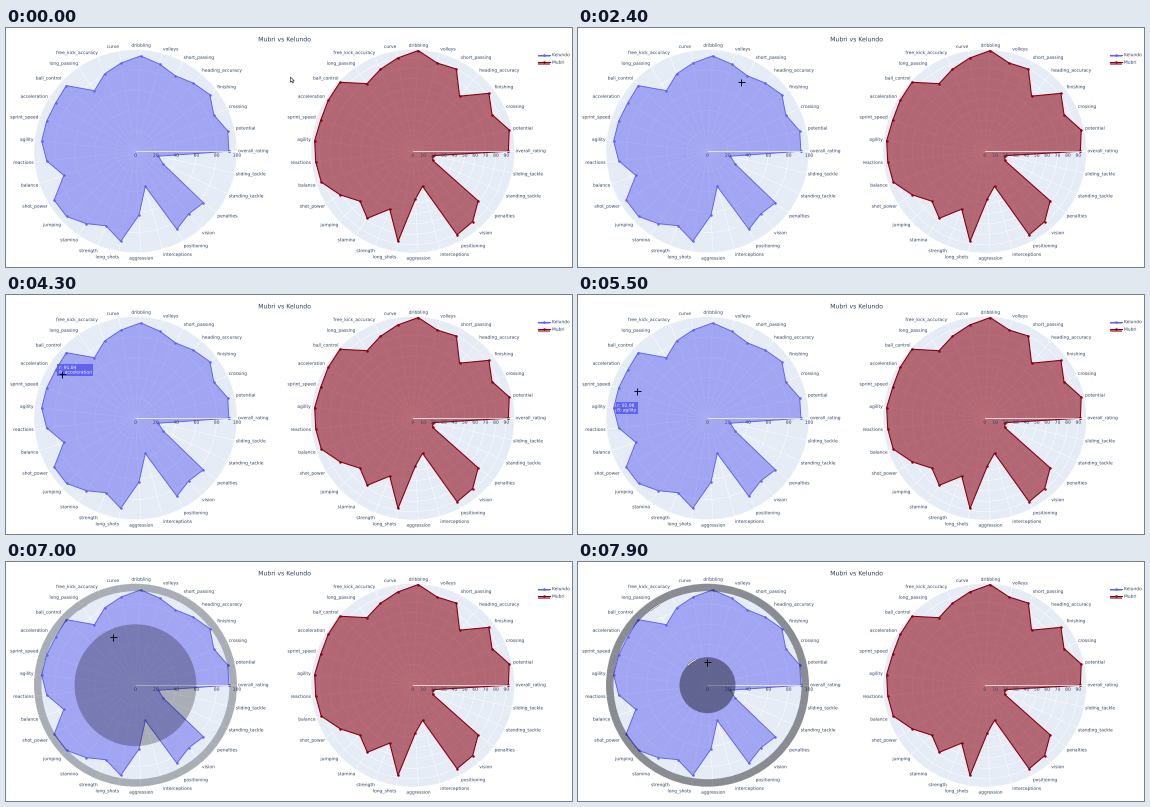
Animation of 566x239 px, one loop 8000 ms. Source, as a matplotlib script:

```python
import numpy as np
import matplotlib.pyplot as plt
from matplotlib.animation import FuncAnimation
from matplotlib.patches import Circle, Polygon, Rectangle, Wedge
from matplotlib.patheffects import Normal

W, H, DPI = 566, 239, 64
PT = 72 / DPI  # points per pixel
FRAMES, STEP = 80, 100
R, CY = 101.5, 123.2
LEFT, RIGHT = 129.5, 406.8
INK, PAPER, BLUE, RED = "#2a3f5f", "#e5ecf6", "#6062f0", "#8b0010"
FIRST, SECOND = "Kelundo", "Mubri"

SKILLS = """overall_rating potential crossing finishing heading_accuracy
short_passing volleys dribbling curve free_kick_accuracy long_passing
ball_control acceleration sprint_speed agility reactions balance shot_power
jumping stamina strength long_shots aggression interceptions positioning
vision penalties standing_tackle sliding_tackle""".split()
ANGLES = np.arange(len(SKILLS)) * 2 * np.pi / len(SKILLS)


def profile(**turns):
    """Ratings for all skills, interpolated between the turning points."""
    at = [SKILLS.index(name) for name in turns]
    return np.interp(range(len(SKILLS)), at, list(turns.values()))


blue_values = profile(
    overall_rating=92, potential=93, crossing=85, finishing=92,
    short_passing=84, dribbling=94, free_kick_accuracy=82, long_passing=72,
    ball_control=93.96, acceleration=91.84, agility=92.96, reactions=88,
    balance=74.5, shot_power=93.5, jumping=93.5, strength=79, long_shots=90,
    interceptions=36, positioning=87, vision=81, penalties=84,
    standing_tackle=30, sliding_tackle=23)
red_values = profile(
    overall_rating=92, potential=95, crossing=84, finishing=92,
    heading_accuracy=69.5, short_passing=89.5, volleys=88, dribbling=97,
    long_passing=78.5, ball_control=96.5, sprint_speed=93.5, agility=95,
    balance=93, jumping=70, stamina=78, strength=60, long_shots=88,
    aggression=46, interceptions=35, positioning=91, vision=89, penalties=79,
    standing_tackle=21, sliding_tackle=20)

plt.rcParams.update({"font.family": "DejaVu Sans", "text.hinting": "none",
                     "toolbar": "None"})
fig = plt.figure(figsize=(W / DPI, H / DPI), dpi=DPI, facecolor="white")
ax = fig.add_axes([0, 0, 1, 1])
ax.set(xlim=(0, W), ylim=(H, 0))
ax.axis("off")


def label(x, y, text, size=4.42, **kw):
    # The path effect draws glyphs as outlines, keeping subpixel spacing
    kw = {"color": INK, "ha": "center", "va": "center", **kw}
    return ax.text(x, y, text, fontsize=size * PT,
                   path_effects=[Normal()], **kw)


def polar(cx, radius, angle):
    return cx + radius * np.cos(angle), CY - radius * np.sin(angle)


def radar(cx, values, top, step, color, opacity, width):
    ax.add_patch(Circle((cx, CY), R, fc=PAPER, lw=0, zorder=1))
    unit = R / top
    ticks = np.arange(0, top + 0.1, step)
    grid = dict(lw=0.45 * PT, zorder=1.1)
    for t in ticks[1:]:
        ax.add_patch(Circle((cx, CY), t * unit, fill=False, ec="white", **grid))
    for a, name in zip(ANGLES, SKILLS):
        x, y = polar(cx, R, a)
        ax.plot([cx, x], [CY, y], color="white", **grid)
        c, s = np.cos(a), np.sin(a)
        ha = "center" if abs(c) < 0.1 else "left" if c > 0 else "right"
        label(x + 1.2 * c, y - (4.2 if s > 0 else 6) * s, name, ha=ha)
    points = np.column_stack(polar(cx, values * unit, ANGLES))
    ax.add_patch(Polygon(points, fc=color, alpha=opacity, lw=0, zorder=2))
    ax.plot(*np.vstack([points, points[:1]]).T, color=color, lw=width * PT,
            marker="o", ms=2.5 * PT, mew=0, zorder=2.1)
    ax.plot([cx, cx + R], [CY, CY], color="white", lw=0.7 * PT, zorder=2.2)
    for t in ticks:
        label(cx + t * unit, CY + 4.4, f"{t:.0f}", zorder=2.3)
    return points


def legend_row(y, name, color, opacity):
    ax.add_patch(Rectangle((532, y), 11.6, 2.5, fc=color, alpha=opacity, lw=0))
    ax.plot([532, 543.6], [y, y], color=color, lw=1.1 * PT)
    ax.plot([537.8], [y], "o", color=color, ms=2.5 * PT, mew=0)
    label(546, y + 0.4, name, ha="left")


blue_points = radar(LEFT, blue_values, 100, 20, BLUE, 0.5, 0.95)
radar(RIGHT, red_values, 97.7, 10, RED, 0.56, 1.1)
label(278.5, 11.7, f"{SECOND} vs {FIRST}", size=6.15)
legend_row(26.7, FIRST, BLUE, 0.5)
legend_row(34.2, SECOND, RED, 0.56)

# Zoom selection: dimmed outer ring, dimmed inner disc, two corner handles
OUTER, DRAG_ANGLE = 94, np.radians(124)
shade = dict(fc="black", lw=0, zorder=5)
ring = ax.add_patch(Wedge((LEFT, CY), R, 0, 360, width=R - OUTER, **shade))
disc = ax.add_patch(Circle((LEFT, CY), OUTER, **shade))
handles = [[ax.plot([], [], color=c, lw=w * PT, zorder=6,
                    solid_capstyle="butt")[0]
            for c, w in (("#444444", 1.6), ("white", 0.9))] for _ in range(2)]


def hover_label(name):
    i = SKILLS.index(name)
    x, y = blue_points[i]
    box = label(x + 3.5, y, f"r: {blue_values[i]:.2f}\nθ: {name}",
                color="white", ha="left", zorder=7, linespacing=1.25,
                bbox=dict(boxstyle="square,pad=0.38", fc=BLUE, lw=0))
    tip = ax.add_patch(Polygon([(x, y), (x + 2, y - 2), (x + 2, y + 2)],
                               fc=BLUE, lw=0, zorder=7))
    return box, tip


HOVERS = [(hover_label("ball_control"), 2600, 3500),
          (hover_label("acceleration"), 3500, 4800),
          (hover_label("agility"), 4800, 5900)]

ARROW = np.array([(0, 0), (0, 5.3), (1.2, 4.2), (2.1, 6), (2.9, 5.6),
                  (2.1, 3.9), (3.8, 3.9)])
arrow = ax.add_patch(Polygon(ARROW, fc="white", ec="#222222", lw=0.6 * PT,
                             zorder=9))
cross, = ax.plot([], [], "+", color="black", ms=7 * PT, mew=0.9 * PT, zorder=9)

# Pointer stops: time, x, y
STOPS = np.array([(0, 284.5, 49), (1600, 270.5, 42), (3100, 69, 64),
                  (4300, 56, 78.5), (5500, 59, 96), (6700, 78, 47),
                  (7000, 106.5, 75), (7900, 129, 100)])


def update(frame):
    t = frame * STEP
    x, y = (np.interp(t, STOPS[:, 0], STOPS[:, k]) for k in (1, 2))
    inside = min(np.hypot(x - cx, y - CY) for cx in (LEFT, RIGHT)) < R
    arrow.set_xy(ARROW + (x, y))
    arrow.set_visible(not inside)
    cross.set_data([x], [y])
    cross.set_visible(inside)

    for artists, start, end in HOVERS:
        for artist in artists:
            artist.set_visible(start <= t < end)

    dim = np.interp(t, [6800, 7000, 7150], [0, 0.26, 0.4])
    radius = np.interp(t, [6700, 7000, 7900], [OUTER, 61, 28])
    ring.set_alpha(dim)
    disc.set_alpha(dim)
    disc.set_radius(radius)
    for pair, r in zip(handles, (OUTER, radius)):
        span = DRAG_ANGLE + np.linspace(-5, 5, 15) / r
        for line in pair:
            line.set_data(*polar(LEFT, r, span))
            line.set_alpha(np.clip((dim - 0.2) / 0.2, 0, 1))
    return []


anim = FuncAnimation(fig, update, frames=FRAMES, interval=STEP, repeat=True,
                     repeat_delay=0, blit=False)
plt.show()
```
